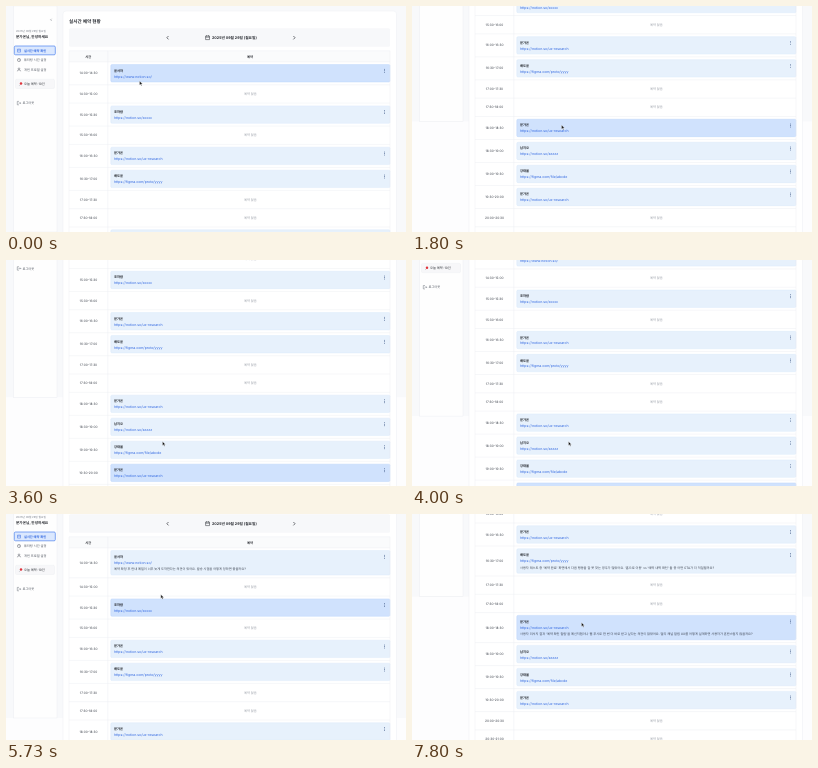
An HTML page for the animation above (8 s loop, 400x226 px).

```html
<!DOCTYPE html>
<html lang="ko">
<head>
<meta charset="utf-8">
<title>실시간 예약 현황</title>
<style>
  html, body { margin: 0; width: 100%; height: 100%; overflow: hidden; background: #fdfdfe; }
  svg { display: block; width: 400px; height: 226px; }
  text {
    font-family: Inter, "Noto Sans CJK KR", "Noto Sans CJK", "Noto Sans CJK JP", sans-serif;
    text-rendering: geometricPrecision;
    white-space: pre;
  }
</style>
</head>
<body>
<svg id="stage" viewBox="0 0 400 226"></svg>
<script>
const LOOP = 8000;
const BOOKED = 23, EMPTY = 18.3, OPEN = 30, TABLE_TOP = 55.8;
const INK = '#25282e', GREY = '#7b818c', BLUE = '#2f66e0', LINE = '#eceef2';

const rows = [
  { name: '윤서하', url: 'https://www.notion.so/',
    note: '예약 확정 후 안내 메일이 너무 늦게 도착한다는 의견이 있어요. 발송 시점을 어떻게 정하면 좋을까요?' },
  {},
  { name: '조하람', url: 'https://notion.so/xxxxx',
    note: '캘린더 예약 문항을 만들었는데 모바일 환경에서 날짜 선택이 너무 불편하다는 피드백이 있어요. 모바일 전용 날짜 필드로의 추천하고 계신 아이디어가 있을까요?' },
  {},
  { name: '문가온', url: 'https://notion.so/ux-research' },
  { name: '배도윤', url: 'https://figma.com/proto/yyyy',
    note: "사용자 테스트 중 '예약 완료' 화면에서 다음 행동을 잘 못 찾는 경우가 많았어요. '홈으로 이동' vs '예약 내역 확인' 둘 중 어떤 CTA가 더 적절할까요?" },
  {},
  {},
  { name: '문가온', url: 'https://notion.so/ux-research',
    note: "사용자 리서치 결과 '예약 확인 알림'을 메신저앱이나 웹 푸시로 한 번 더 바로 받고 싶다는 의견이 많았어요. 멀티 채널 알림 UX를 어떻게 설계하면 사용자가 혼란스럽지 않을까요?" },
  { name: '남지오', url: 'https://notion.so/zzzzz' },
  { name: '강태율', url: 'https://figma.com/file/abcde' },
  { name: '문가온', url: 'https://notion.so/ux-research' },
  {},
  {}
];

// Time in ms, then the value or values
const scrollKeys = [[70, 0], [900, 52], [1800, 110.5], [2250, 129], [3000, 129], [3730, 80],
  [3870, 78], [4000, 70], [4400, 22], [6200, 22], [6270, 64], [6330, 108.2], [6600, 143.4]];
const cursorKeys = [[300, 133.5, 75], [1600, 149.5, 119], [1850, 149.5, 119], [2450, 156.5, 181.5],
  [4250, 156.5, 181.5], [4680, 154.5, 41.5], [5150, 154.5, 41.5], [5500, 154.5, 62],
  [5900, 155, 92], [6600, 155, 92], [6850, 160, 46], [7100, 160, 46], [7530, 169.5, 108.5]];
const hoverKeys = [[0, 0], [900, -1], [1600, 8], [2100, 9], [2200, 10], [2320, 11], [4350, -1],
  [4600, 0], [5520, -1], [5700, 2], [6580, -1], [6720, 5], [7280, -1], [7400, 8]];
const openTimes = { 0: 5000, 2: 5950, 5: 6950, 8: 7730 };

const smooth = p => p * p * (3 - 2 * p);

function sample(keys, t, ease = p => p) {
  if (t <= keys[0][0]) return keys[0].slice(1);
  for (let i = 1; i < keys.length; i++) {
    const [a, ...from] = keys[i - 1], [b, ...to] = keys[i];
    if (t < b) {
      const p = ease((t - a) / (b - a));
      return from.map((v, j) => v + (to[j] - v) * p);
    }
  }
  return keys[keys.length - 1].slice(1);
}

function add(parent, tag, attrs) {
  const el = document.createElementNS('http://www.w3.org/2000/svg', tag);
  for (const key in attrs) el.setAttribute(key, attrs[key]);
  parent.appendChild(el);
  return el;
}

const box = (parent, x, y, width, height, fill, more) =>
  add(parent, 'rect', { x, y, width, height, fill, ...more });

const stroke = (parent, d, color, width = .5) =>
  add(parent, 'path', { d, fill: 'none', stroke: color, 'stroke-width': width });

// y is the middle of the line
function label(parent, str, x, y, size, fill, more) {
  const el = add(parent, 'text', { x, y: y + size * .36, 'font-size': size, fill, ...more });
  el.textContent = str;
  return el;
}

const bold = { 'font-weight': 700 };
const semi = { 'font-weight': 600 };
const centered = { 'text-anchor': 'middle' };

const stage = document.getElementById('stage');
const page = add(stage, 'g', {});

function drawSidebar() {
  box(page, 0, 0, 400, 226, '#f8f9fb');
  box(page, 7.5, 0, 43.5, 226, '#fefefe', { stroke: LINE, 'stroke-width': .5 });
  stroke(page, 'M45.6 12.8l-1 1 1 1', '#555b66', .45);
  label(page, '2025년 09월 29일 월요일', 10, 25.2, 2.65, GREY);
  label(page, '문가온님, 안녕하세요', 10, 31, 3.65, INK, bold);

  box(page, 8.3, 40, 41, 8.8, '#dbe8fe', { rx: 1.2, stroke: '#4c83ee', 'stroke-width': .7 });
  const items = [['실시간 예약 확인', 44.4], ['튜터링 시간 설정', 54], ['개인 프로필 설정', 63.6]];
  items.forEach(([str, y], i) => {
    const color = i ? '#4a505b' : BLUE;
    label(page, str, 18, y, 3.2, color, i ? {} : semi);
    if (i === 0) stroke(page, `M11.5 ${y - 1.3}h3v3h-3zM11.5 ${y - .3}h3`, color, .45);
    if (i === 1) {
      add(page, 'circle', { cx: 13, cy: y, r: 1.6, fill: 'none', stroke: color, 'stroke-width': .45 });
      stroke(page, `M13 ${y - 1}v1l.8.4`, color, .35);
    }
    if (i === 2) {
      add(page, 'circle', { cx: 13, cy: y - .9, r: .8, fill: 'none', stroke: color, 'stroke-width': .45 });
      stroke(page, `M11.4 ${y + 1.7}q0-1.5 1.6-1.5t1.6 1.5`, color, .45);
    }
  });

  box(page, 9.5, 73.3, 39, 9.2, '#f7f7f9', { rx: 1.2, stroke: '#eaecf0', 'stroke-width': .4 });
  stroke(page, 'M13.2 79.8l1.2-1.3', '#8a8f98', .4);
  add(page, 'circle', { cx: 15, cy: 77.6, r: 1.25, fill: '#e0343c' });
  label(page, '오늘 예약: 10건', 18, 78, 3.2, INK);
  stroke(page, 'M13 95.4h-1.7v3.4h1.7M12.5 97.1h2.3M14 96.3l.8.8-.8.8', '#5f6570', .45);
  label(page, '로그아웃', 16.5, 97.2, 3.2, '#4a505b');
}

function drawHeader() {
  label(page, '실시간 예약 현황', 63, 15.6, 4.6, INK, bold);
  box(page, 63, 22.3, 321, 18.5, '#f7f8fa', { rx: 1.5 });
  stroke(page, 'M162.5 30l-1.6 1.7 1.6 1.7M287.4 30l1.6 1.7-1.6 1.7', INK, .65);
  stroke(page, 'M199.6 30h3.9v3.6h-3.9zM199.6 31.2h3.9M200.6 29.2v1.2M202.5 29.2v1.2', INK, .5);
  label(page, '2025년 09월 29일 (월요일)', 206, 31.7, 3.7, INK, bold);
  box(page, 63, 44.8, 321, 11, '#fafbfc');
  label(page, '시간', 82.3, 50.5, 3.2, INK, { ...semi, ...centered });
  label(page, '예약', 244, 50.5, 3.2, INK, { ...semi, ...centered });
}

function clock(i) {
  const m = 840 + i * 30;
  return String(Math.floor(m / 60)) + ':' + String(m % 60).padStart(2, '0');
}

function drawRow(row, i) {
  const g = add(page, 'g', {});
  const part = { g };
  stroke(g, 'M63 0H384', LINE, .5);
  part.time = label(g, `${clock(i)}-${clock(i + 1)}`, 82.5, 0, 3.2, '#3c414b', centered);
  if (!row.name) {
    label(g, '예약 없음', 244.3, EMPTY / 2, 3.2, '#9a9fa8', centered);
    return part;
  }
  part.card = box(g, 104.8, 2.8, 279.2, 17.4, '#e7f1fc', { rx: 1.2, 'stroke-width': .4 });
  label(g, row.name, 108, 8.8, 3.3, INK, bold);
  label(g, row.url, 108, 14.7, 3.5, BLUE);
  for (let k = -1; k < 2; k++)
    add(g, 'circle', { cx: 378.5, cy: 9 + k * 1.5, r: .48, fill: '#35507f' });
  if (row.note) part.note = label(g, row.note, 108, 21.5, 3.18, '#3c4350');
  return part;
}

drawSidebar();
const panel = box(page, 57, 5, 333.5, 347, '#ffffff', { rx: 3, stroke: LINE, 'stroke-width': .5 });
drawHeader();
const parts = rows.map(drawRow);
const edges = stroke(page, '', LINE);
const cursor = add(stage, 'path', {
  d: 'M0 0V4.1L1 3.2 1.7 4.7 2.4 4.4 1.7 3H3Z',
  fill: '#111', stroke: '#fff', 'stroke-width': .35
});

function render(t) {
  const [scroll] = sample(scrollKeys, t);
  const [cx, cy] = sample(cursorKeys, t, smooth);
  const hover = hoverKeys.filter(k => k[0] <= t).pop()[1];
  let y = TABLE_TOP;

  rows.forEach((row, i) => {
    const { g, time, card, note } = parts[i];
    const open = t >= openTimes[i];
    const height = !row.name ? EMPTY : open ? OPEN : BOOKED;
    g.setAttribute('transform', `translate(0 ${y})`);
    time.setAttribute('y', height / 2 + 1.15);
    if (card) {
      card.setAttribute('height', height - 5.6);
      card.setAttribute('fill', i === hover ? '#d0e2fd' : '#e7f1fc');
      card.setAttribute('stroke', i === hover ? '#b3cffa' : '#d4e5fa');
    }
    if (note) note.setAttribute('visibility', open ? 'visible' : 'hidden');
    y += height;
  });

  panel.setAttribute('height', y + 2.4 - 5);
  edges.setAttribute('d', `M63 44.8H384V${y}H63ZM101.8 44.8V${y}`);
  page.setAttribute('transform', `translate(0 ${-scroll})`);
  cursor.setAttribute('transform', `translate(${cx} ${cy})`);
}

const start = performance.now();
function tick() {
  render((performance.now() - start) % LOOP);
  requestAnimationFrame(tick);
}
tick();
</script>
</body>
</html>
```
